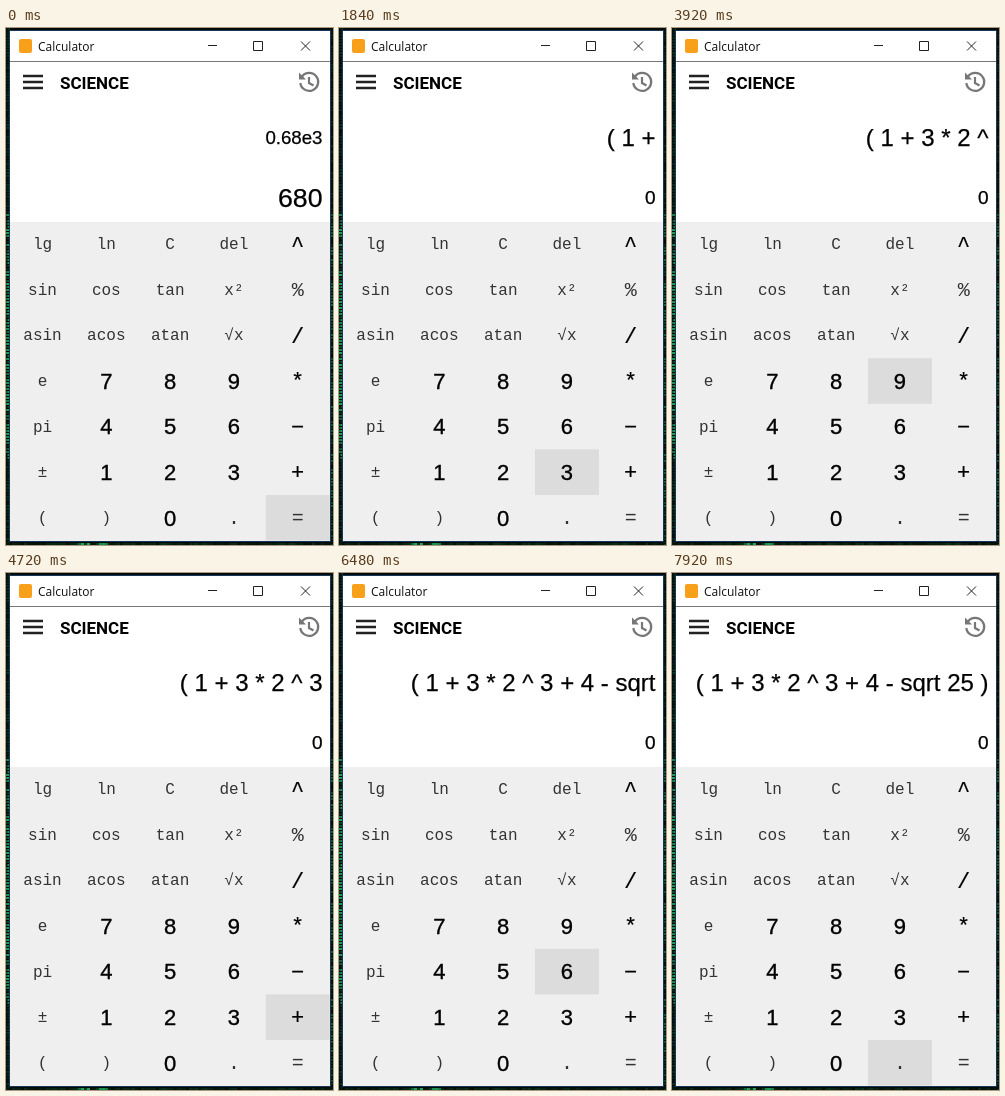
These frames come from a looping animation (327x517 px, 8 s). An HTML page:

```html
<!DOCTYPE html>
<html lang="en">
<head>
<meta charset="utf-8">
<title>Calculator</title>
<style>
  html, body { margin: 0; width: 100%; height: 100%; overflow: hidden; background: #000; }
  svg { display: block; width: 327px; height: 517px; }
  text { fill: #111; }
  .title { font: 12px "Open Sans", "Noto Sans", sans-serif; }
  .mode { font: bold 17px Roboto, sans-serif; fill: #000; }
  .readout { font-family: "Liberation Sans", Arial, sans-serif; text-anchor: end; fill: #000; stroke: #000; stroke-width: .25; }
  .key { text-anchor: middle; font-family: "Liberation Mono", "Courier New", monospace; fill: #333; }
  .digit { font-family: "Liberation Sans", Arial, sans-serif; fill: #000; stroke: #000; stroke-width: .35; }
  .operator { fill: #000; stroke: #000; stroke-width: .2; }
</style>
</head>
<body>
<svg viewBox="0 0 327 517" xmlns="http://www.w3.org/2000/svg">
  <rect width="327" height="517" fill="#030a07"/>
  <g id="backdrop"></g>

  <rect x="3.5" y="2.5" width="321" height="511" fill="#fff" stroke="#16365c"/>
  <path d="M4 33.5H324" stroke="#777"/>
  <rect x="13" y="11" width="13" height="14" rx="2" fill="#f9a01b"/>
  <text class="title" x="32" y="23">Calculator</text>
  <path d="M202 17.5H211M247.5 13.5h9v9h-9zM295 13.5l9 9m0-9l-9 9" fill="none" stroke="#222"/>

  <path d="M17 48H37M17 54H37M17 60H37" stroke="#222" stroke-width="2.7"/>
  <text class="mode" x="54" y="61">SCIENCE</text>
  <g fill="none" stroke="#777" stroke-width="2.2">
    <path d="M296 48.5A9 9 0 1 1 294.3 55M303 49V55L307.5 57.5"/>
    <path d="M293 44.5V51.5H300z" fill="#777" stroke="none"/>
  </g>
  <text id="expr" class="readout" x="316.5"></text>
  <text id="result" class="readout" x="316.5"></text>

  <rect x="4" y="194" width="320" height="319" fill="#efefef"/>
  <rect id="hover" width="64" height="45.6" fill="#dcdcdc"/>
  <g id="keys"></g>
</svg>
<script>
const LOOP = 8000;
const CELL = { x: 5, y: 193.6, w: 63.8, h: 45.55 };
const ROWS = [
  'lg ln C del ^', 'sin cos tan x² %', 'asin acos atan √x /',
  'e 7 8 9 *', 'pi 4 5 6 -', '± 1 2 3 +', '( ) 0 . ='
].map(row => row.split(' '));

// Key under the pointer, from each time on.
const HOVERS = [
  [0, '='], [80, '.'], [160, '0'], [240, ')'], [320, '('],
  [640, ')'], [720, '1'], [1040, '2'], [1120, '5'], [1200, '6'], [1360, '+'],
  [1760, '3'], [2080, '6'], [2160, '*'],
  [2480, '6'], [2560, '3'], [2640, '2'], [2960, '3'], [3040, '6'], [3120, '9'], [3200, '*'],
  [3280, '/'], [3360, '%'], [3440, '^'], [3760, '%'], [3840, '/'], [3920, '9'], [4000, '6'], [4080, '3'],
  [4480, '+'], [5040, '6'], [5120, '5'], [5200, '4'], [5440, '5'], [5520, '6'], [5600, '-'],
  [5920, '6'], [6000, '9'], [6080, '√x'], [6400, '9'], [6480, '6'], [6560, '3'], [6640, '2'],
  [6880, '5'], [7200, '2'], [7280, '0'], [7360, ')'], [7760, '0'], [7840, '.']
];

// Token appended to the expression, from each time on.
const PRESSES = [
  [480, '('], [880, '1'], [1520, '+'], [1920, '3'], [2320, '*'], [2800, '2'], [3600, '^'],
  [4240, '3'], [4880, '+'], [5360, '4'], [5840, '-'], [6240, 'sqrt'],
  [6720, '2'], [7040, '5'], [7680, ')']
];

const byId = id => document.getElementById(id);
const expr = byId('expr'), result = byId('result'), hover = byId('hover');
const cells = {};

function addNode(parent, tag, attrs) {
  const node = document.createElementNS('http://www.w3.org/2000/svg', tag);
  for (const name in attrs) node.setAttribute(name, attrs[name]);
  return parent.appendChild(node);
}

// Green code rain that shows around the window.
function addBackdrop() {
  let seed = 7;
  const random = () => (seed = seed * 16807 % 2147483647) / 2147483647;
  const speck = (x, y, glow) => addNode(byId('backdrop'), 'rect', {
    x, y, width: 3, height: 2, fill: '#1fa45a', opacity: glow * random()
  });
  for (let y = 0; y < 517; y += 3) {
    const glow = y > 185 && y < 430 ? 1 : .2;
    speck(0, y, glow);
    speck(1.5, y, glow);
    speck(325, y, y > 185 ? .6 : .2);
  }
  for (let x = 0; x < 327; x += 3) speck(x, 515, Math.abs(x - 85) < 15 ? 1 : .25);
}

function keyStyle(label) {
  if (/^\d$/.test(label)) return { class: 'key digit', size: 22, drop: .36 };
  if (/^[\^*\/+-]$/.test(label)) return { class: 'key operator', size: 22, drop: .33 };
  if (/^[%.=]$/.test(label)) return { class: 'key', size: 20, drop: .32 };
  return { class: 'key', size: 16, drop: .31 };
}

function addKey(label, row, col) {
  const x = CELL.x + col * CELL.w, y = CELL.y + row * CELL.h;
  const style = keyStyle(label);
  const node = addNode(byId('keys'), 'text', {
    class: style.class,
    x: x + CELL.w / 2 - .4,
    y: y + CELL.h / 2 + style.size * style.drop,
    'font-size': style.size
  });
  node.textContent = label === '-' ? '−' : label;
  cells[label] = { x: x - .5, y };
}

function setReadout(node, text, size, y) {
  node.textContent = text;
  node.setAttribute('font-size', size);
  node.setAttribute('y', y);
}

function draw(t) {
  const cell = cells[HOVERS.filter(h => h[0] <= t).pop()[1]];
  hover.setAttribute('x', cell.x);
  hover.setAttribute('y', cell.y);

  const tokens = PRESSES.filter(p => p[0] <= t).map(p => p[1]);
  if (tokens.length) {
    setReadout(expr, tokens.join(' ').replace('2 5', '25'), 24, 118);
    setReadout(result, '0', 19, 176);
  } else {
    setReadout(expr, '0.68e3', 18.67, 116);
    setReadout(result, '680', 26.67, 179);
  }
}

addBackdrop();
ROWS.forEach((row, r) => row.forEach((label, c) => addKey(label, r, c)));

const start = performance.now();
function tick() {
  draw((performance.now() - start) % LOOP);
  requestAnimationFrame(tick);
}
tick();
</script>
</body>
</html>
```
